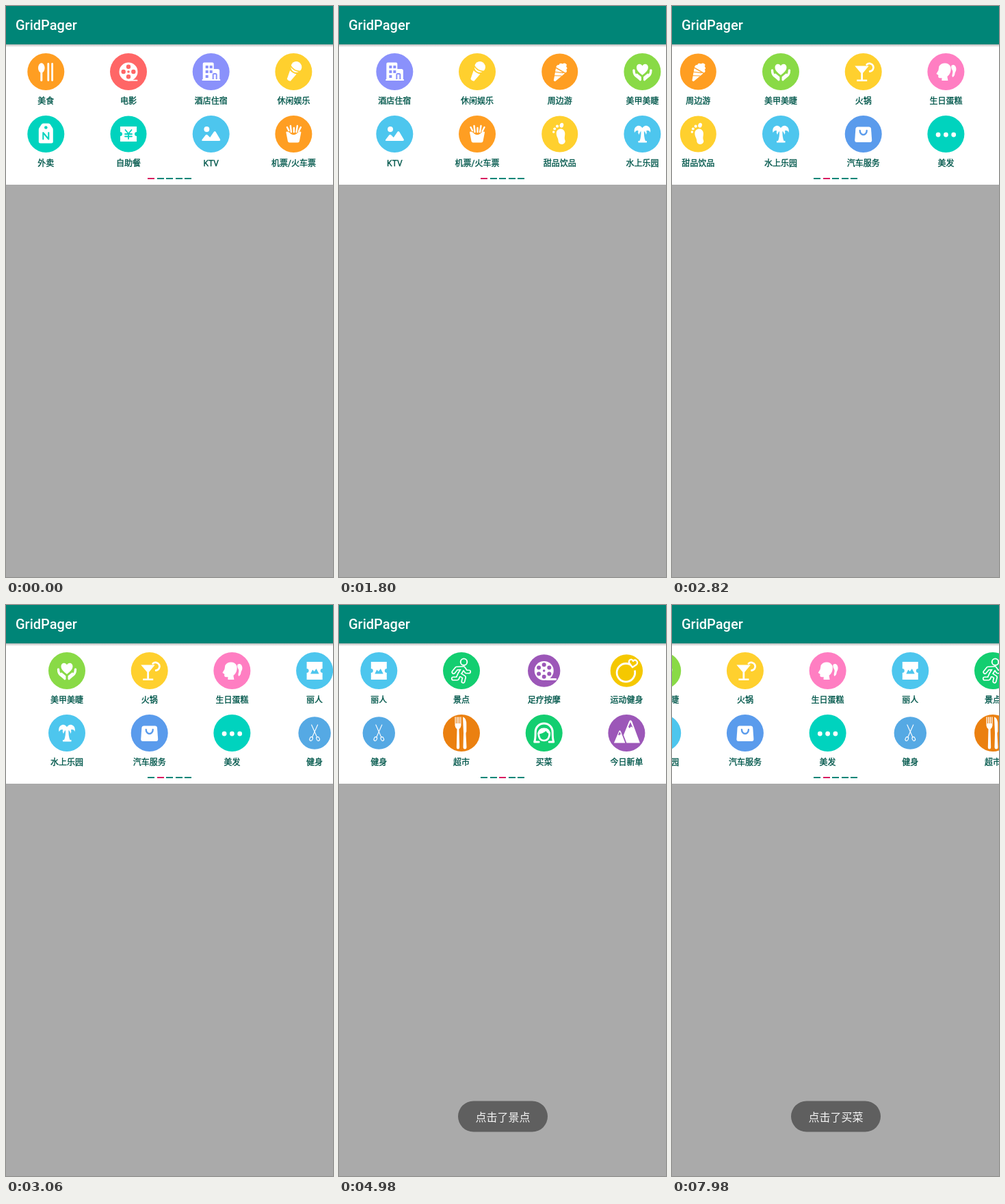
Write an HTML page that moves like this. It is 478 px wide and 834 px high and loops after 8000 ms.

```html
<!DOCTYPE html>
<html lang="zh-CN">
<head>
<meta charset="utf-8">
<title>GridPager</title>
<style>
html, body { margin: 0; width: 100%; height: 100%; overflow: hidden; background: #aaa; }
svg { display: block; width: 478px; height: 834px; font-family: Roboto, "Noto Sans CJK SC", "Noto Sans CJK", sans-serif; }
.icon { fill: #fff; stroke-linecap: round; stroke-linejoin: round; }
.hole { fill: currentColor; }
.line { fill: none; stroke: #fff; }
.cut { fill: none; stroke: currentColor; }
.label { font-size: 12px; fill: #00574b; stroke: #00574b; stroke-width: .35px; text-anchor: middle; }
</style>
</head>
<body>
<svg viewBox="0 0 478 834">
  <defs>
    <linearGradient id="shade" x2="0" y2="1">
      <stop stop-color="#b8b8b8"/><stop offset="1" stop-color="#fff"/>
    </linearGradient>
  </defs>
  <rect width="478" height="834" fill="#aaa"/>
  <rect y="56" width="478" height="205" fill="#fff"/>
  <rect y="56" width="478" height="4" fill="url(#shade)"/>
  <rect width="478" height="56" fill="#008577"/>
  <text x="14" y="35" font-size="20" font-weight="500" fill="#fff">GridPager</text>
  <g id="strip"></g>
  <g id="dots"></g>
  <g id="toast">
    <rect x="174" y="724.5" width="131" height="45" rx="22.5" fill="#5f5f5f"/>
    <text id="message" x="239.5" y="753.5" font-size="16" fill="#f5f5f5" text-anchor="middle"></text>
  </g>
</svg>
<script>
const $ = id => document.getElementById(id);
const PITCH = 120.7, PAGE = 4 * PITCH, STEP = 60, LOOP = 8000;

// Icon helpers; every icon is centred on 0,0
const fill = d => `<path d="${d}"/>`;
const hole = d => `<path class="hole" d="${d}"/>`;
const line = (d, w = 3) => `<path class="line" stroke-width="${w}" d="${d}"/>`;
const cut = (d, w = 2) => `<path class="cut" stroke-width="${w}" d="${d}"/>`;
const dot = (x, y, r, c = '') => `<circle class="${c}" cx="${x}" cy="${y}" r="${r}"/>`;
const ring = (x, y, r, w) => `<circle class="line" cx="${x}" cy="${y}" r="${r}" stroke-width="${w}"/>`;
const oval = (x, y, rx, ry, a = 0) => `<ellipse rx="${rx}" ry="${ry}" transform="translate(${x} ${y}) rotate(${a})"/>`;
const turn = (a, s) => `<g transform="rotate(${a})">${s}</g>`;
const hollow = d => line(d, 6.2) + cut(d, 2.8);
const reel = (r, n, gap, size) => {
  let s = dot(0, 0, r) + dot(0, 0, 1.8, 'hole');
  for (let i = 0; i < n; i++) {
    const a = i / n * 2 * Math.PI - Math.PI / 2;
    s += dot(gap * Math.cos(a), gap * Math.sin(a), size, 'hole');
  }
  return s;
};

const ORANGE = '#ff9e22', YELLOW = '#ffd02e', TEAL = '#00d3be', SKY = '#4dc6ee',
      GREEN = '#13ce70', PURPLE = '#9c57b8';

// Column by column: label, colour, radius, drawing
const items = [
  ['美食', ORANGE, 27, oval(-6.5, -5.5, 4.8, 7.2) + line('M-6.5 0V12.5') + line('M3.5-11.5V12.5M9.3-11.5V12.5', 2.8)],
  ['外卖', TEAL, 27, fill('M-4-15.5H4Q5.5-15.5 6.5-14L10-8.5Q10.5-7.5 10.5-6V11Q10.5 13.5 8 13.5H-8Q-10.5 13.5-10.5 11V-6Q-10.5-7.5-10-8.5L-6.5-14Q-5.5-15.5-4-15.5Z')
    + dot(0, -9.5, 2.3, 'hole') + cut('M-4 7.5V-2L4 7.5V-2', 2)],
  ['电影', '#ff6666', 27, reel(13.5, 4, 7.3, 3.2) + line('M0 12.7H12.5', 1.8)],
  ['自助餐', TEAL, 26.5, fill('M-12-11H12V-3A3 3 0 0 0 12 3V11H-12V3A3 3 0 0 0-12-3Z')
    + cut('M-4.5-6L0-.5L4.5-6M0-.5V7M-5 0H5M-5 3.5H5', 1.8)],
  ['酒店住宿', '#8a91fb', 27, fill('M-10-13.5H2Q4-13.5 4-11.5V-4H10Q12.5-4 12.5-1.5V11H13.5V13H-13V11H-12V-11.5Q-12-13.5-10-13.5Z')
    + hole('M-8-9h4v4h-4zM-2-9h4v4h-4zM-8-2h4v4h-4zM-2-2h4v4h-4zM-8 5h4v4h-4zM2 11V4.5Q2 2 4.5 2H6.5Q9 2 9 4.5V11H7V4H4V11Z')],
  ['KTV', SKY, 27, dot(-6.3, -7, 4) + fill('M-13 10Q-14 9-13 8L-8 1.5Q-6.5 0-5 1.5L-1.5 5L4-3Q5.5-5 7-3L13.5 8Q14 10 12 10Z')],
  ['休闲娱乐', YELLOW, 27, turn(30, dot(0, -8, 8) + fill('M-5.5 1Q0 3 5.5 1L3 14Q0 16-3 14Z') + cut('M-8.5-5.5Q0-.5 8.5-5.5', 1.6))],
  ['机票/火车票', ORANGE, 27, line('M-9.5-10L-7-5M-4.5-12L-3.5-3M.5-9V-3M5.5-12L4-3M10.5-10L7.5-4', 2.4)
    + fill('M-11-2.5Q-11-4-9-3.5Q-6-3-4.5-.5Q0 3 4.5-.5Q6-3 9-3.5Q11-4 11-2.5L8.5 10.5Q8 12.5 6 12.5H-6Q-8 12.5-8.5 10.5Z')],
  ['周边游', ORANGE, 26.5, turn(30, fill('M-8-3Q-9-7-6-8Q-7-12-2-12Q-1-16 4-14Q3-12 5-11Q8-10 6.5-7.5Q10-6 8-3Z')
    + fill('M-7.5-1.5H7.5L1.5 15Q0 17-1.5 15Z') + cut('M-6.5 4L5-1M-4 9L5 4', 1.1))],
  ['甜品饮品', YELLOW, 26.5, fill('M-5-1C-5-9 6-10 7.5-2C8 3 6 5 8 10C8 16-1 17-2 11C-2 6-5 4-5-1Z')
    + dot(-9, -3, 1.7) + dot(-7.5, -7.7, 1.9) + dot(-3.7, -11.3, 2.1) + oval(2.7, -12.8, 2.8, 3.5, 15)],
  ['美甲美睫', '#89da46', 27, fill('M0 5C-5 1-8.5-2-8.5-6.5C-8.5-12-2-13 0-8.5C2-13 8.5-12 8.5-6.5C8.5-2 5 1 0 5Z')
    + line('M-12.5-2Q-12.5 5-7 8L-3.5 11M12.5-2Q12.5 5 7 8L3.5 11', 3.4) + line('M-8 4L-3 8V12M8 4L3 8V12', 2.8)],
  ['水上乐园', SKY, 27, fill('M-2-5H2.5Q2 4 4.5 10H6.5V12.5H-6V10H-4Q-1.5 4-2-5Z')
    + fill('M0-9Q-4-14-8-11.5Q-13-9-11.5-2Q-9-6-6-5Q-7-2-5 1Q-3-5 0-5Q4-5 5.5 1Q7-2 6-5Q10-6 11.5-2Q13-9 8-11.5Q4-14 0-9Z')],
  ['火锅', YELLOW, 27, fill('M-12.5-8.5H8L-.7 2V11.5H5.5V14H-9.5V11.5H-3.5V2Z') + line('M5-10.5A5.8 5.8 0 1 1 9.5-.5', 2.8)],
  ['汽车服务', '#5a9bec', 27, fill('M-8.5-10.5H8.5Q11-10.5 11.3-8L12.5 9Q12.5 12 9.8 12H-9.8Q-12.5 12-12.5 9L-11.3-8Q-11-10.5-8.5-10.5Z')
    + cut('M-5-5A5 6 0 0 0 5-5', 2.4)],
  ['生日蛋糕', '#ff7ec2', 27, fill('M-10-8C-6-14 4-14 7-7C8-1 6 4 2 7L3 13H-6V9C-10 10-12 9-11 5L-14 3L-11-2Z')
    + fill('M8-9C13-13 17-5 14 0C12 4 14 5 10 8C8 6 10 3 10 0C10-3 7-4 8-9Z')],
  ['美发', TEAL, 27, dot(-11.3, 1, 3.4) + dot(0, 1, 3.4) + dot(11.3, 1, 3.4)],
  ['丽人', SKY, 27, fill('M-11.5-13H11.5V-3A3 3 0 0 0 11.5 3V13H-11.5V3A3 3 0 0 0-11.5-3Z')
    + hole('M-6 4.5L-3-1.5L-.5 1L2.5-3L6.5 4.5Z')],
  ['健身', '#55a9e4', 23.7, line('M-4.5-12L3.5 6M4.5-12L-3.5 6', 1.1)
    + `<g class="line" stroke-width="1.1">${oval(-5, 8.5, 2.1, 2.9, 25)}${oval(5, 8.5, 2.1, 2.9, -25)}</g>`],
  ['景点', GREEN, 27, hollow('M-11.5 2L-7-3.5L3-4L7 1.5H11M2-3L-3 5L4 9.5L2.5 15.5M-3 5L-6 11.5H-12')
    + ring(3.5, -12.8, 4.8, 1.9)],
  ['超市', '#eb8010', 27, fill('M-9.5-23.5H-8.2V-14H-7V-23.5H-5.6V-14H-4.4V-23.5H-3V-14H-1.8V-23.5H-.5V-11Q-1-7-3.5-5.5L-2.8 21Q-3 23.5-5 23.5T-7.2 21L-6.5-5.5Q-9-7-9.5-11Z')
    + fill('M2-23.5Q7.5-22 7.3-12V-2Q6.5-1 6.5 1L7.5 21Q7.3 23.5 5 23.5T2.5 21L3 0Z')],
  ['足疗按摩', PURPLE, 23.7, reel(14, 6, 8.8, 3) + line('M4 12.5H17', 2.8)],
  ['买菜', GREEN, 27, line('M-7.5 13H-14Q-12.5 9-12.5-1.5A12.5 12.5 0 0 1 12.5-1.5Q12.5 9 14 13H7.5', 3)
    + line('M-8 0Q-8 11 0 11T8 0', 2.6) + fill('M-9.3 2Q-9-7.5 0-7.5T9.3 2Q4 0 3-3Q-2 1-9.3 2Z')],
  ['运动健身', '#f5c800', 23.7, ring(-1, 2.8, 13.3, 2.8) + hole('M1-17L17-17V-2L10 0Z')
    + line('M8.5-5L3.5-12Q3-16 7-16.5Q9-16 9.5-14Q12-17 14.5-14.5Q17-12 14.5-9Z', 2.2)],
  ['今日新单', PURPLE, 27, fill('M-18.5 14.5L-11.5-2Q-10.5-5-8.5-2.5L-2 14.5Z') + fill('M-4.5 3L3.5-16.5Q5.5-21 8-16.5L19.5 14.5H0Z')
    + hole('M-12.3 2.5L-10.2-2L-7.8 2.5L-9.5 1.5L-10.5 3.5ZM2.5-9L5.6-16L9-8L6.5-9.5L4.5-7Z')]
];

$('strip').innerHTML = items.map(([label, color, r, art], i) => {
  const x = 58.3 + (i >> 1) * PITCH, y = i % 2 ? 187 : 96;
  return `<g transform="translate(${x} ${y})">
    <g class="icon" color="${color}"><circle class="hole" r="${r}"/>${art}</g>
    <text class="label" y="47.4">${label}</text></g>`;
}).join('');
$('dots').innerHTML = [0, 1, 2, 3, 4].map(i => `<rect x="${Math.round(207 + 13.5 * i)}" y="251" width="10" height="2"/>`).join('');

const clamp = v => Math.max(0, Math.min(1, v));

// A slow drag, then a decelerating fling to the next page
function swipe(t, ease) {
  const i = t / STEP;
  if (i < 0) return 0;
  if (i <= 4) return 20 + 70 * (i / 4) ** 1.5;
  return 90 + (PAGE - 90) * (1 - (1 - clamp((i - 4) / 9)) ** ease);
}

function swipeBack(t) {
  const i = t / STEP + 1;
  return i < 1 ? 0 : 290 * (i / 3) ** 1.8;
}

function draw(now) {
  const t = Math.floor(now % LOOP / STEP) * STEP;
  const offset = swipe(t - 1500, 3.36) + swipe(t - 2820, 3.57) - swipeBack(t - 7860);
  $('strip').setAttribute('transform', `translate(${-offset} 0)`);
  const page = Math.round(offset / PAGE);
  [...$('dots').children].forEach((d, i) => d.setAttribute('fill', i === page ? '#d81b60' : '#008577'));

  const second = t >= 7000;
  const alpha = second ? clamp((t - 7080) / 240)
    : Math.min(clamp((t - 4620) / 360), 1 - clamp((t - 6660) / 240));
  $('toast').setAttribute('opacity', alpha);
  $('message').textContent = second ? '点击了买菜' : '点击了景点';
}

const start = performance.now();
function tick() {
  draw(performance.now() - start);
  requestAnimationFrame(tick);
}
tick();
</script>
</body>
</html>
```
